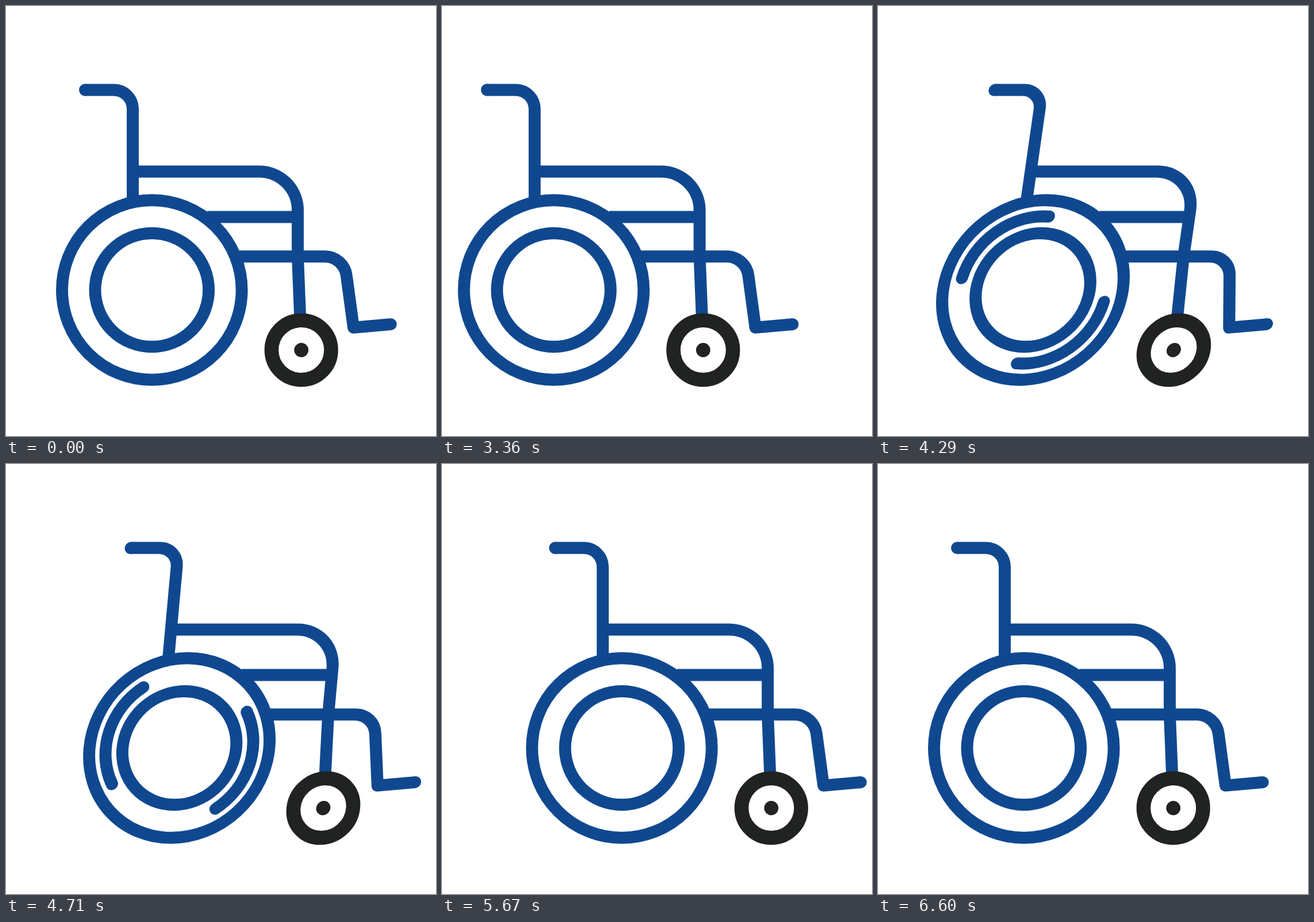
Animation of 748x748 px, one loop 6.63 s. Source, as an HTML page:

```html
<!DOCTYPE html>
<html lang="en">
<head>
<meta charset="utf-8">
<title>Wheelchair</title>
<style>
  html, body { margin: 0; width: 100%; height: 100%; overflow: hidden; background: #fff; }
  svg { display: block; width: 100vw; height: 100vh; }
</style>
</head>
<body>
<svg viewBox="0 0 748 748">
  <g id="chair" fill="none" stroke="#104890" stroke-width="20.9" stroke-linejoin="round">
    <path d="M220.5 340V179A33 33 0 0 0 187.5 146H137.5" />
    <path d="M220.5 288H440.3A67.2 67.2 0 0 1 507.5 355.2V436L511.8 545M350 367H507.5" />
    <path d="M402 435.8H555A38 38 0 0 1 592.3 469L604.5 559.3L669.3 553.7" />
    <path d="M137.5 146h1M668.8 553.7h.5" stroke-linecap="round" />
    <circle cx="253.8" cy="494" r="156.3" />
    <circle cx="253.8" cy="494" r="98.8" />
    <path id="streaks" stroke-linecap="round" />
    <circle cx="513.7" cy="598.5" r="51.8" stroke="#212322" stroke-width="24.6" />
    <circle cx="513.7" cy="598.5" r="12.4" fill="#212322" stroke="none" />
  </g>
</svg>
<script>
const LOOP = 6630, STEP = 30, REACH = 66, FLOOR = 662;
const chair = document.getElementById('chair');
const streaks = document.getElementById('streaks');

const smooth = p => p * p * (3 - 2 * p);
const part = (t, from, to) => Math.min(1, Math.max(0, (t - from) / (to - from)));
const ease = (t, from, to) => smooth(part(t, from, to));

// Cubic easing with flat ends and handles at x1 and x2
function bezier(u, x1, x2) {
  let lo = 0, hi = 1;
  for (let i = 0; i < 24; i++) {
    const p = (lo + hi) / 2, q = 1 - p;
    if (3 * q * q * p * x1 + 3 * q * p * p * x2 + p ** 3 < u) lo = p; else hi = p;
  }
  return smooth(lo);
}

function arc(mid, span) {
  const point = deg => {
    const a = deg * Math.PI / 180;
    return `${253.8 + 128 * Math.cos(a)} ${494 + 128 * Math.sin(a)}`;
  };
  return `M${point(mid - span / 2)}A128 128 0 0 1 ${point(mid + span / 2)}`;
}

function draw(now) {
  const t = Math.floor(now % LOOP / STEP) * STEP;

  // Back up, lean and roll forward, drift home
  const shift = REACH * (2 * bezier(part(t, 3600, 5437), 0.2, 0.583)
    - ease(t, 3000, 3448) - ease(t, 5437, 6600));
  const lean = 0.144 * (ease(t, 3600, 4230) - ease(t, 4230, 5400));
  chair.setAttribute('transform', `matrix(1 0 ${-lean} 1 ${shift + lean * FLOOR} 0)`);

  const span = 85 * (ease(t, 3600, 3960) - ease(t, 4710, 5340));
  const mid = -83.1 + 411 * ease(t, 3600, 5400);
  streaks.setAttribute('d', span > 0.5 ? arc(mid, span) + arc(mid + 180, span) : '');

  requestAnimationFrame(draw);
}
requestAnimationFrame(draw);
</script>
</body>
</html>
```
